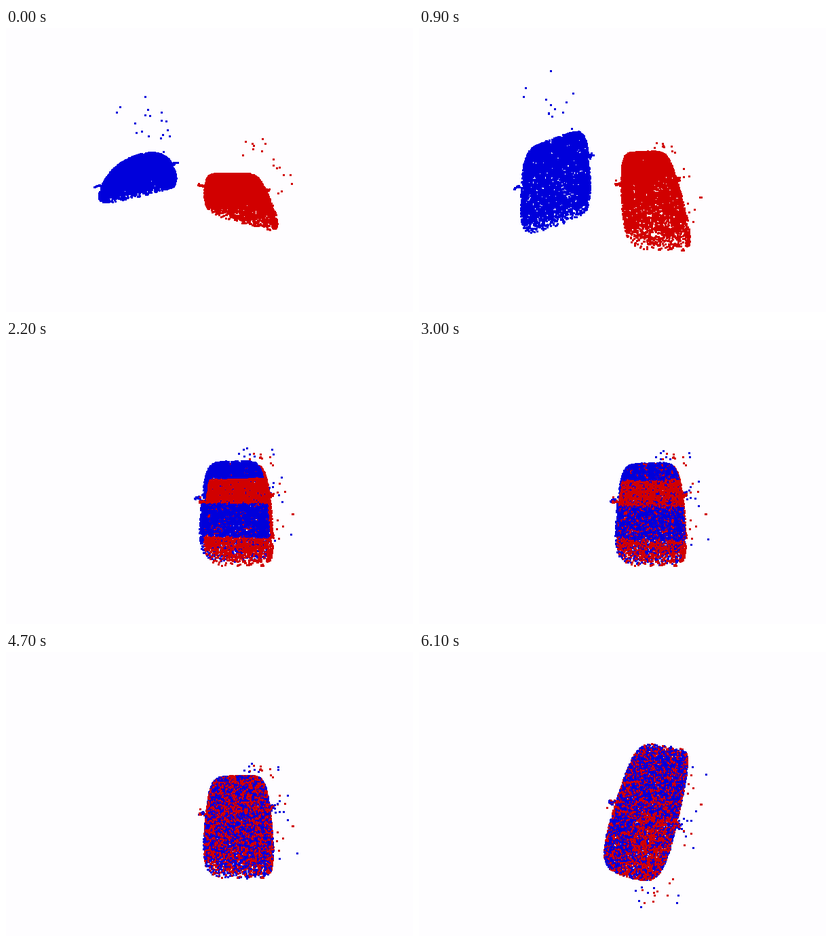
Animation of 600 by 418 pixels, one loop 6.2 s. Source, as a matplotlib script:

```python
import numpy as np
import matplotlib.pyplot as plt
from matplotlib.animation import FuncAnimation

W, H, DPI = 600, 418, 100
FRAMES, STEP_MS = 62, 100
RED, BLUE = (0.82, 0, 0, 1), (0, 0, 0.86, 1)
CENTER = np.array([345, 262])


def make_cloud(rng):
    """Points in car space: a across (-1..1), v from front to rear (0..1), height h."""
    n = 5500
    a, v = rng.uniform(-1, 1, n), rng.uniform(0, 1, n)
    thinning = np.clip(1 - 0.85 * (v - 0.85) / 0.15, 0, 1)
    keep = (rng.uniform(0, 1, n) < thinning) | (a > 0.88)
    # Corners are rounded and the sides swell a little
    b = 2 * v - 1
    body_a = a * (1 - 0.12 * b ** 6) * (1 + 0.06 * (1 - b ** 2))
    body_v = (1 + b * (1 - 0.12 * a ** 6)) / 2

    parts = [(body_a[keep], body_v[keep], np.zeros(keep.sum()))]
    for side, along in ((-1.2, 0.45), (1.1, 0.38)):
        parts.append((rng.normal(side, 0.06, 14), rng.normal(along, 0.012, 14), np.zeros(14)))
    parts.append((rng.uniform(1.15, 1.75, 12), rng.uniform(-0.1, 0.85, 12),
                  rng.uniform(0.5, 1.1, 12)))
    parts.append((rng.uniform(0.2, 0.95, 6), rng.uniform(-0.16, -0.04, 6),
                  rng.uniform(0.3, 0.9, 6)))
    return [np.concatenate(c) for c in zip(*parts)]


def project(cloud, front, rear, arch=0, rise=(0, 0)):
    """Perspective view of the car between its front edge and its rear edge.

    Each edge holds its left and right end; arch bends the front edge,
    rise is the screen direction of height.
    """
    a, v, h = cloud
    front, rear = np.array(front), np.array(rear)

    def on_edge(edge):
        return edge.mean(0) + a[:, None] * (edge[1] - edge[0]) / 2

    near_front = (1 - v) / np.linalg.norm(front[1] - front[0])
    near_rear = v / np.linalg.norm(rear[1] - rear[0])
    k = (near_rear / (near_front + near_rear))[:, None]
    points = on_edge(front) * (1 - k) + on_edge(rear) * k
    points[:, 1] += arch * np.clip(1 - a ** 2, 0, 1) * (1 - v)
    return points + h[:, None] * np.array(rise)


def turned(p):
    """The car swung round so that its front points left, closer to the eye."""
    d = p - CENTER
    x = d[:, 1] * np.where(d[:, 1] < 0, 1.9, 1.1)
    return CENTER + np.column_stack([x, -0.9 * d[:, 0]])


def swing(a, b, angle):
    return CENTER + np.cos(angle) * (a - CENTER) + np.sin(angle) * (b - CENTER)


def tumble(top, end, t):
    angle = np.interp(t, [49, 56, 58, 61], [0, 0.6, np.pi / 2, np.pi])
    if angle <= np.pi / 2:
        return swing(top, turned(top), angle)
    return swing(turned(top), end, angle - np.pi / 2)


def mix(a, b, k):
    return a + (b - a) * k


rng = np.random.default_rng(4)
red, blue = make_cloud(rng), make_cloud(rng)

red_low = project(red, [(298, 214), (370, 214)], [(292, 272), (410, 305)], rise=(0, -50))
red_high = project(red, [(300, 183), (366, 181)], [(303, 324), (409, 332)])
blue_low = project(blue, [(152, 212), (236, 186)], [(133, 262), (256, 236)],
                   arch=-12, rise=(-50, -70))
blue_high = project(blue, [(157, 178), (244, 146)], [(150, 309), (254, 274)],
                    rise=(-70, -60))
top_view = dict(front=[(303, 184), (381, 181)], rear=[(289, 331), (398, 336)])
end_view = dict(front=[(264, 312), (358, 338)], rear=[(322, 133), (402, 143)], arch=7)
red_top, blue_top = project(red, **top_view), project(blue, **top_view)
red_end, blue_end = project(red, **end_view), project(blue, **end_view)

# How far blue still is from its match
a, v, h = blue
gap = np.column_stack([-6 - 3 * h, -4 - 3 * v - 4 * h])
# Which colour lies on top: stripes at first, a red patch in the last view
stripes = np.where(np.searchsorted([0.22, 0.51, 0.81], v) % 2, -1, 1)
patch = 0.12 - 0.45 * np.exp(-((a - 0.3) ** 2 + 4 * (v - 0.2) ** 2) / 0.3)

n_red = len(red_top)
depth = rng.uniform(0, 1, n_red + len(blue_top))
colors = np.array([RED] * n_red + [BLUE] * len(blue_top))


def red_points(t):
    if t <= 9:
        return mix(red_low, red_high, t / 9)
    if t <= 49:
        return mix(red_high, red_top, min((t - 9) / 3, 1))
    return tumble(red_top, red_end, t)


def blue_points(t):
    if t <= 9:
        return mix(blue_low, blue_high, t / 9) + [-18 * np.sin(np.pi * t / 9), 0]
    if t < 13:
        return blue_high + np.array([-38, -12]) * min((t - 9) / 3, 1)
    if t <= 49:
        return blue_top + gap * np.exp((22 - max(t, 14)) / 7)
    return tumble(blue_top, blue_end, t)


fig = plt.figure(figsize=(W / DPI, H / DPI), dpi=DPI, facecolor="#fefdff")
ax = fig.add_axes([0, 0, 1, 1])
ax.set(xlim=(0, W), ylim=(H, 0))
ax.axis("off")
dots = ax.scatter(np.zeros(len(colors)), np.zeros(len(colors)), marker="s",
                  s=(3 * 72 / DPI) ** 2, linewidths=0, antialiased=False)


def draw(t):
    points = np.floor(np.vstack([red_points(t), blue_points(t)])) + 0.5
    flicker = np.random.default_rng(100 + t).uniform(0, 0.3, len(points))
    height = depth + flicker
    striped = np.interp(t, [22, 30, 38, 47], [0.95, 0.35, 0.08, 0])
    patched = np.interp(t, [50, 58], [0, 1])
    height[n_red:] += striped * stripes + patched * patch
    order = np.argsort(height)
    dots.set_offsets(points[order])
    dots.set_facecolors(colors[order])
    return [dots]


anim = FuncAnimation(fig, draw, frames=FRAMES, interval=STEP_MS,
                     repeat=True, repeat_delay=0, blit=False)
plt.show()
```
